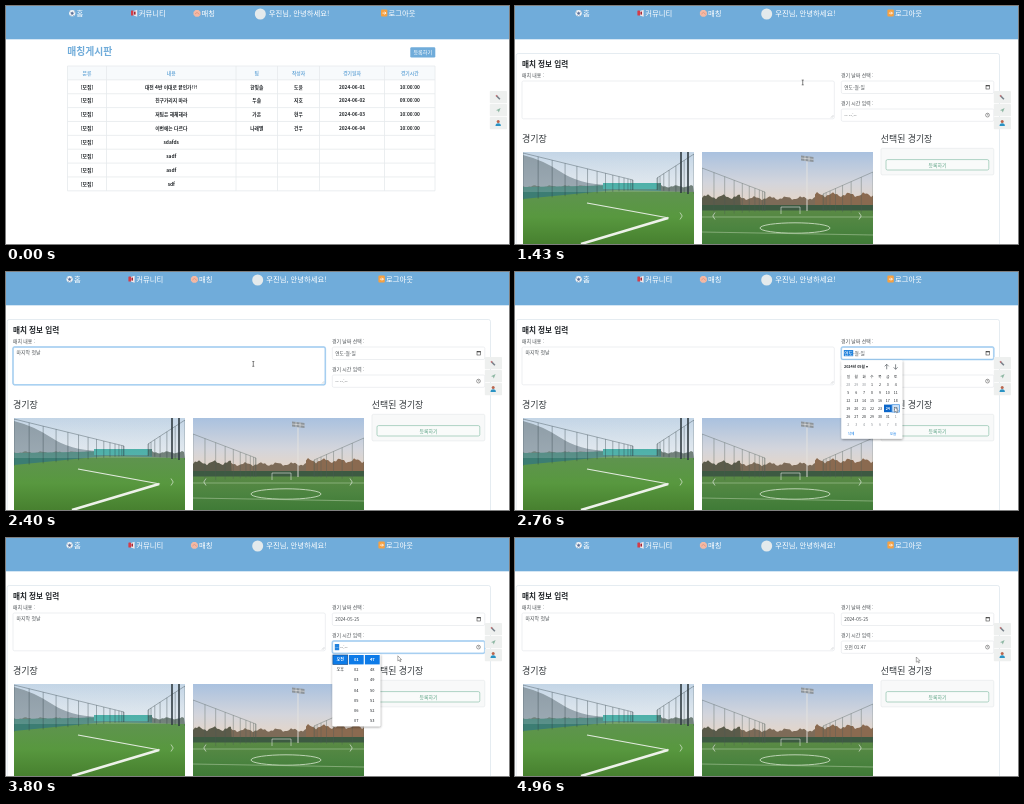
Recreate the animation shown at these times as an HTML page. Size 503 by 238 pixels, loop 5 s.

```html
<!DOCTYPE html>
<html lang="ko">
<head>
<meta charset="utf-8">
<title>매칭게시판</title>
<style>
  html, body { margin: 0; width: 100%; height: 100%; overflow: hidden; background: #fff; }
  svg { display: block; width: 100vw; height: 100vh; }
  text { font-family: 'Noto Sans CJK KR', 'Noto Sans CJK', 'Noto Sans', sans-serif; white-space: pre; }
</style>
</head>
<body>
<svg id="stage" viewBox="0 0 503 238"></svg>
<script>
const LOOP = 5000, OPEN_FORM = 1060;
const BLUE = '#70acda', INK = '#212529', SOFT = '#4b5054', GRID = '#e6eaed', PICK = '#0d7be8';

const rect = (x, y, w, h, fill = 'none', extra = '') =>
  `<rect x="${x}" y="${y}" width="${w}" height="${h}" fill="${fill}" ${extra}/>`;
const path = (d, stroke, width = 1, fill = 'none', extra = '') =>
  `<path d="${d}" stroke="${stroke}" stroke-width="${width}" fill="${fill}" ${extra}/>`;
const circle = (x, y, r, fill, extra = '') => `<circle cx="${x}" cy="${y}" r="${r}" fill="${fill}" ${extra}/>`;
// y is the optical middle of the line
const text = (x, y, s, size, fill = INK, extra = '') =>
  `<text x="${x}" y="${y + size * 0.37}" font-size="${size}" fill="${fill}" ${extra}>${s}</text>`;
const mid = (x, y, s, size, fill, extra = '') => text(x, y, s, size, fill, 'text-anchor="middle" ' + extra);
const during = (from, to, markup) => `<g data-from="${from}" data-to="${to}">${markup}</g>`;
const BOLD = 'font-weight="700"';
const outline = (color, r = 1.5) => `stroke="${color}" stroke-width=".6" rx="${r}"`;
const field = (x, y, w, h) => rect(x, y, w, h, '#fff', outline('#e1e5e8'));
const focus = (x, y, w, h) =>
  rect(x, y, w, h, 'none', 'rx="2" stroke="#b9daf6" stroke-width="1.8" opacity=".7"') +
  rect(x, y, w, h, 'none', outline('#7fbaeb'));

function nav() {
  const label = (x, s) => text(x, 7, s, 7.35, '#fff', 'font-weight="500"');
  return circle(66.2, 7.2, 3.1, '#f2f5f7') +
    path('M66.2 6l1.2.9-.5 1.4h-1.4l-.5-1.4zM63.5 5.6l1 .7M68.9 5.6l-1 .7M64.8 9.8l.4-.9M67.6 9.8l-.4-.9', '#5b6f98', .6, '#5b6f98') +
    label(70.5, '홈') +
    rect(125, 4.5, 2.6, 5, '#d43c48', 'rx=".6"') + path('M127.6 5l3.6-1.3v7l-3.6-1.3z', 'none', 0, '#f4e9ea') +
    rect(128, 5.6, 1.6, 3, '#a32736') + label(132.8, '커뮤니티') +
    path('M187.5 6l2-2h3l2 2v3l-2 1.8h-3l-2-2z', 'none', 0, '#f3b9a5') + path('M189 8l2-1.6 2.4 2', '#d98570', .6) +
    label(195.6, '매칭') +
    circle(254.3, 8, 5.5, '#e4eaec') + label(262.8, '우진님, 안녕하세요!') +
    rect(375, 3.6, 6.4, 7, '#f6a142', 'rx="1"') + path('M376.5 7.1h3.4m-1.3-1.4l1.4 1.4-1.4 1.4', '#fff', .8) +
    label(382.6, '로그아웃');
}

function sideButtons() {
  return [85, 98, 111].map(y => rect(483.8, y, 17.2, 12.2, '#eef0ef', 'rx=".8"')).join('') +
    path('M490.3 89.6l3.6 3.6', '#77808a', 1.5) + path('M490 89.3l1.2 1.2', '#c8787c', 1.4) +
    path('M490 104.3l4.6-2.4-1.8 4.6-.9-1.8z', 'none', 0, '#8fb8a4') +
    circle(492.2, 115.6, 1.5, '#b9664f') + path('M489.5 120q0-2.8 2.7-2.8t2.7 2.8z', 'none', 0, '#2a93c4');
}

function board() {
  const cols = [61.5, 100.5, 230, 271.5, 313.5, 378.5, 429], top = 60, step = 13.87;
  const rows = [
    ['분류', '내용', '팀', '작성자', '경기일자', '경기시간'],
    ['[모집]', '대전 4반 이대로 끝인가!?!', '한빛솔', '도윤', '2024-06-01', '10:00:00'],
    ['[모집]', '친구가리지 마라', '두솔', '지호', '2024-06-02', '09:00:00'],
    ['[모집]', '저팀은 해체해라', '가온', '현우', '2024-06-03', '10:00:00'],
    ['[모집]', '이번에는 다르다', '나래별', '건우', '2024-06-04', '10:00:00'],
    ...['sdafds', 'sadf', 'asdf', 'sdf'].map(s => ['[모집]', s])
  ];
  const bottom = top + step * rows.length;
  let out = text(61.2, 45, '매칭게시판', 9.8, BLUE, BOLD) + rect(61.5, top, 367.5, step, '#f7fafc');
  for (let i = 0; i <= rows.length; i++) out += path(`M61.5 ${top + i * step}H429`, GRID, .8);
  cols.forEach(x => out += path(`M${x} ${top}V${bottom}`, GRID, .8));
  rows.forEach((row, i) => row.forEach((s, j) =>
    out += mid((cols[j] + cols[j + 1]) / 2, top + (i + .5) * step, s, 4.8, i ? INK : BLUE, BOLD)));
  const button = fill => rect(404.3, 41.3, 25, 10.2, fill, 'rx="1.2"') + mid(416.8, 46.4, '등록하기', 5.1, '#fff');
  return out + during(0, 780, button(BLUE)) +
    during(780, OPEN_FORM, button('#4690c4') + rect(0, 234, 18, 4, '#e6edf1') +
      text(1, 236, 'localhost:5173/match', 1.6, '#66727c'));
}

const chevrons = (x, dir) => path(`M${x} 206.5l${2.2 * dir} 3.5l${-2.2 * dir} 3.5`, '#fff', .7, 'none', 'opacity=".8"');

function mesh(x0, x1, y0, y1, b0, b1, color, posts = 12) {
  let d = '';
  for (let i = 0; i <= posts; i++) {
    const k = 1 - (1 - i / posts) ** 2;
    d += `M${x0 + (x1 - x0) * k} ${y0 + (y1 - y0) * k}V${b0 + (b1 - b0) * k}`;
  }
  return path(d + `M${x0} ${y0}L${x1} ${y1}`, color, .6, 'none', 'opacity=".6"');
}

function trees(x0, x1, base, height, fill) {
  let d = `M${x0} ${base}`;
  for (let x = x0; x <= x1; x += 2) d += `L${x} ${base - height * (.85 + .1 * Math.sin(x * .4) + .05 * Math.sin(x * 1.9))}`;
  return path(d + `L${x1} ${base}z`, 'none', 0, fill);
}

function photos() {
  const left = rect(8, 146, 171, 92, 'url(#day)') +
    path('M8 149Q28 154 46 166T92 179V190H8z', 'none', 0, '#8d9ca6') +
    trees(8, 179, 188, 9, '#5c6d64') +
    path('M8 181L70 180L146 177V185L8 194z', 'none', 0, '#3c7d73') + rect(88, 177, 54, 6, '#35a79d') +
    path('M8 193L100 184L179 186V238H8z', 'none', 0, 'url(#turf)') +
    rect(8, 146, 171, 40, 'url(#haze)') +
    mesh(8, 118, 147, 174, 194, 184, '#2c3b40', 14) + mesh(179, 142, 148, 172, 188, 184, '#2c383c', 7) +
    path('M166 146V187M173 146V188', '#313c42', 1.6) +
    path('M66 238L153 212', '#eef2ea', 2.6) + path('M154 212L72 197', '#e3ebdf', 1.2) +
    chevrons(165, 1);
  const right = rect(187, 146, 171, 92, 'url(#dusk)') +
    trees(187, 358, 204, 14, '#7d6b58') + trees(187, 226, 206, 18, '#5b5b4a') + trees(300, 358, 204, 18, '#8a6a50') +
    rect(187, 199, 171, 7, '#3d5a42') + rect(187, 204.5, 171, 34, 'url(#pitch)') +
    mesh(187, 250, 162, 186, 210, 205, '#4d5a55', 10) + mesh(358, 308, 166, 188, 208, 205, '#4d5a55', 8) +
    path('M292 151V205', '#e6e4df', .9) + path('M286 149.5l12.5 1.4v5l-12.5-1.4z', 'none', 0, '#8d949a') +
    path('M286 152l12.5 1.4M290 150v5M294 150.5v5', '#e9eaea', .6) +
    path('M266 208V201H285V208', '#dfe4df', .6) +
    '<ellipse cx="280" cy="222" rx="35" ry="5.2" fill="none" stroke="#c9dcc0" stroke-width=".9"/>' +
    path('M187 211H358M187 226L358 229', '#a9c79d', .6) + chevrons(200, -1) + chevrons(344, 1);
  return `<g clip-path="url(#frameA)">${left}</g><g clip-path="url(#frameB)">${right}</g>`;
}

function datePopup() {
  let out = rect(326.3, 88.2, 61, 78.6, '#fff', 'rx="1" filter="url(#drop)"') +
    text(329, 94.7, '2024년 05월 ▾', 3.7, INK, BOLD) +
    path('M371.7 97.3v-5m-2 2l2-2 2 2M380.6 92.3v5m-2-2l2 2 2-2', '#555b61', .7);
  [...'일월화수목금토'].forEach((s, i) => out += mid(333.3 + i * 7.9, 104.4, s, 3.6));
  out += rect(369, 132.6, 7.9, 7.6, '#0b66c9') +
    rect(377, 132.7, 7.4, 7.4, '#cfe3f8', 'stroke="#3c8fe0" stroke-width=".7"');
  for (let i = 0; i < 42; i++) {
    const n = i - 2, day = n < 1 ? n + 30 : n > 31 ? n - 31 : n;
    out += mid(333.3 + i % 7 * 7.9, 112.5 + Math.floor(i / 7) * 8, day, 3.6,
      n === 24 ? '#fff' : n < 1 || n > 31 ? '#8b9096' : INK, n === 24 ? BOLD : '');
  }
  return out + mid(336, 161.2, '삭제', 3.6, PICK) + mid(378, 161.2, '오늘', 3.6, PICK);
}

function timePopup() {
  const cols = [['오전', '오후'], ['01', '02', '03', '04', '05', '06', '07'], ['47', '48', '49', '50', '51', '52', '53']];
  let out = rect(326.3, 116, 48, 72.3, '#fff', 'rx="1" filter="url(#drop)"');
  cols.forEach((col, j) => {
    const x = 334.3 + j * 16;
    out += rect(x - 7.4, 117, 14.8, 9.4, PICK, j ? '' : 'stroke="#174f8c" stroke-width=".7"');
    col.forEach((s, i) => out += mid(x, 121.7 + i * 10.15, s, 4, i ? INK : '#fff', i ? '' : BOLD));
  });
  return out;
}

function form() {
  const label = (x, y, s) => text(x, y, s, 4.9, SOFT);
  const value = (y, s) => text(329.3, y, s, 4.7, SOFT);
  const marked = (y, w, head, tail) => rect(328.8, y - 3.2, w, 6.2, '#2383dd') +
    value(y, `<tspan fill="#fff">${head}</tspan>${tail}`);
  const typed = 'ㅁ|마|맞|마지|마짐|마지마|마지막|마지막 ㅊ|마지막 처|마지막 첫|마지막 첫ㄴ|마지막 첫나|마지막 첫날'.split('|');
  const keyTime = i => 1980 + i * 30;
  const typing = typed.map((s, i) =>
    during(keyTime(i), i < typed.length - 1 ? keyTime(i + 1) : LOOP, text(10.6, 80.2, s, 4.9, SOFT))).join('');

  return rect(1.2, 47.5, 483.3, 200, '#fff', outline('#d3e0e8', 2)) +
    text(7, 58.5, '매치 정보 입력', 7.6, INK, BOLD) +
    label(7, 69, '매치 내용 :') + label(326, 69, '경기 날짜 선택 :') + label(326, 97, '경기 시간 입력 :') +
    field(7, 75, 312.3, 37.8) + path('M316 111.5l2.3-2.3M317.3 111.5l1-1', '#9aa0a5', .4) +
    field(326.3, 75, 152.5, 12.5) + field(326.3, 103, 152.5, 12.3) +
    during(1740, 2560, focus(7, 75, 312.3, 37.8)) +
    during(1740, 1980, path('M10.9 77.3v6', '#555', .5)) + typing +
    // date field
    during(OPEN_FORM, 2560, value(81.2, '연도-월-일')) +
    during(2560, 3460, focus(326.3, 75, 152.5, 12.5)) +
    during(2560, 2860, marked(81.2, 9.4, '연도', '-월-일')) +
    during(2860, 3460, marked(81.2, 10.8, '2024', '-05-25')) +
    during(3460, LOOP, value(81.2, '2024-05-25')) +
    rect(471, 79.4, 3.6, 3.6, 'none', 'stroke="#444" stroke-width=".6"') + path('M471 79.8h3.6', '#333', .9) +
    // time field
    during(OPEN_FORM, 3460, value(109.2, '-- --:--')) +
    during(3460, 4680, focus(326.3, 103, 152.5, 12.3)) +
    during(3460, 4380, marked(109.2, 4.4, '--', ' --:--')) +
    during(4380, LOOP, value(109.2, '오전 01:47')) +
    circle(472.5, 109.1, 1.9, 'none', 'stroke="#444" stroke-width=".5"') + path('M472.5 107.8v1.4h1', '#444', .4) +
    // grounds
    text(7, 132.3, '경기장', 9, '#33383c') + text(365.8, 132.3, '선택된 경기장', 8.9, '#33383c') +
    rect(366, 142.3, 112.8, 26.6, '#f8f9f9', outline('#e3e6e8')) +
    rect(371, 153.6, 102.8, 10.4, '#f9fbfa', outline('#7db99f')) + mid(422.5, 158.8, '등록하기', 4.9, '#5da385') +
    photos() +
    during(2570, 2860, datePopup()) + during(3470, 4400, timePopup());
}

const gradient = (id, ...colors) => `<linearGradient id="${id}" x2="0" y2="1">` +
  colors.map((c, i) => `<stop offset="${i / (colors.length - 1)}" stop-color="${c}"/>`).join('') + '</linearGradient>';

const stage = document.getElementById('stage');
stage.innerHTML = '<defs>' +
  gradient('day', '#c3d5e6', '#dfe7ee', '#e6e8e8', '#c5ccc6') + gradient('dusk', '#a9c1df', '#d3d5dc', '#efd6bd', '#c0a585') +
  gradient('turf', '#5f9350', '#58983f', '#47802f') + gradient('pitch', '#5a8a45', '#4c8440', '#3f7a36') +
  gradient('haze', '#dfe6ec00', '#dfe6ec30') +
  `<clipPath id="frameA">${rect(8, 146, 171, 92)}</clipPath><clipPath id="frameB">${rect(187, 146, 171, 92)}</clipPath>` +
  '<filter id="drop" x="-20%" y="-20%" width="140%" height="140%"><feDropShadow dx=".4" dy="1" stdDeviation="1.2" flood-opacity=".4"/></filter></defs>' +
  rect(0, 0, 503, 33.3, BLUE) + `<g id="nav">${nav()}</g>` +
  during(0, OPEN_FORM, board()) + during(OPEN_FORM, LOOP, form()) +
  `<g id="side">${sideButtons()}</g><g id="cursor">` +
  `<g id="arrow">${path('M0 0V5.2L1.3 4.1 2.2 6 3.1 5.6 2.2 3.8H3.8z', '#333', .4, '#fff')}</g>` +
  `<g id="hand">${path('M0 .3q.6-.7 1.2 0V2.2l2 .5q.6.2.5 1L3.3 6H.6L-1 3.7q.2-.7 1 0z', '#222', .5, '#fff')}</g>` +
  `<g id="beam">${path('M-1 -2.4h2M0 -2.4v4.8M-1 2.4h2', '#333', .6)}</g></g>`;

const track = [
  [250, 470, 178], [850, 417, 48], [1060, 417, 48], [1700, 208, 94], [2350, 208, 94], [2560, 473, 80],
  [2740, 379.5, 135], [2870, 379.5, 135], [3300, 474.5, 107.5], [3480, 474.5, 107.5],
  [3950, 366, 121], [4420, 366, 121], [4880, 401.3, 119]
];

function pointerAt(t) {
  const i = track.findIndex(k => k[0] > t);
  if (i < 1) return (i ? track[track.length - 1] : track[0]).slice(1);
  const a = track[i - 1], b = track[i], k = (t - a[0]) / (b[0] - a[0]), e = k * k * (3 - 2 * k);
  return [a[1] + (b[1] - a[1]) * e, a[2] + (b[2] - a[2]) * e];
}

const byId = id => document.getElementById(id);
const show = (el, on) => el.style.display = on ? '' : 'none';
const timed = [...document.querySelectorAll('[data-from]')];

function draw() {
  const t = performance.now() % LOOP, onForm = t >= OPEN_FORM;
  timed.forEach(g => show(g, t >= +g.dataset.from && t < +g.dataset.to));
  byId('nav').setAttribute('transform', `translate(${onForm ? -2.6 : 0})`);
  byId('side').setAttribute('transform', `translate(${onForm ? -5 : 0})`);
  const [x, y] = pointerAt(t);
  const kind = t > 780 && !onForm ? 'hand' : onForm && x < 319 && y > 75 && y < 113 ? 'beam' : 'arrow';
  show(byId('cursor'), t >= track[0][0]);
  byId('cursor').setAttribute('transform', `translate(${x} ${y})`);
  ['arrow', 'hand', 'beam'].forEach(id => show(byId(id), id === kind));
  requestAnimationFrame(draw);
}
draw();
</script>
</body>
</html>
```
